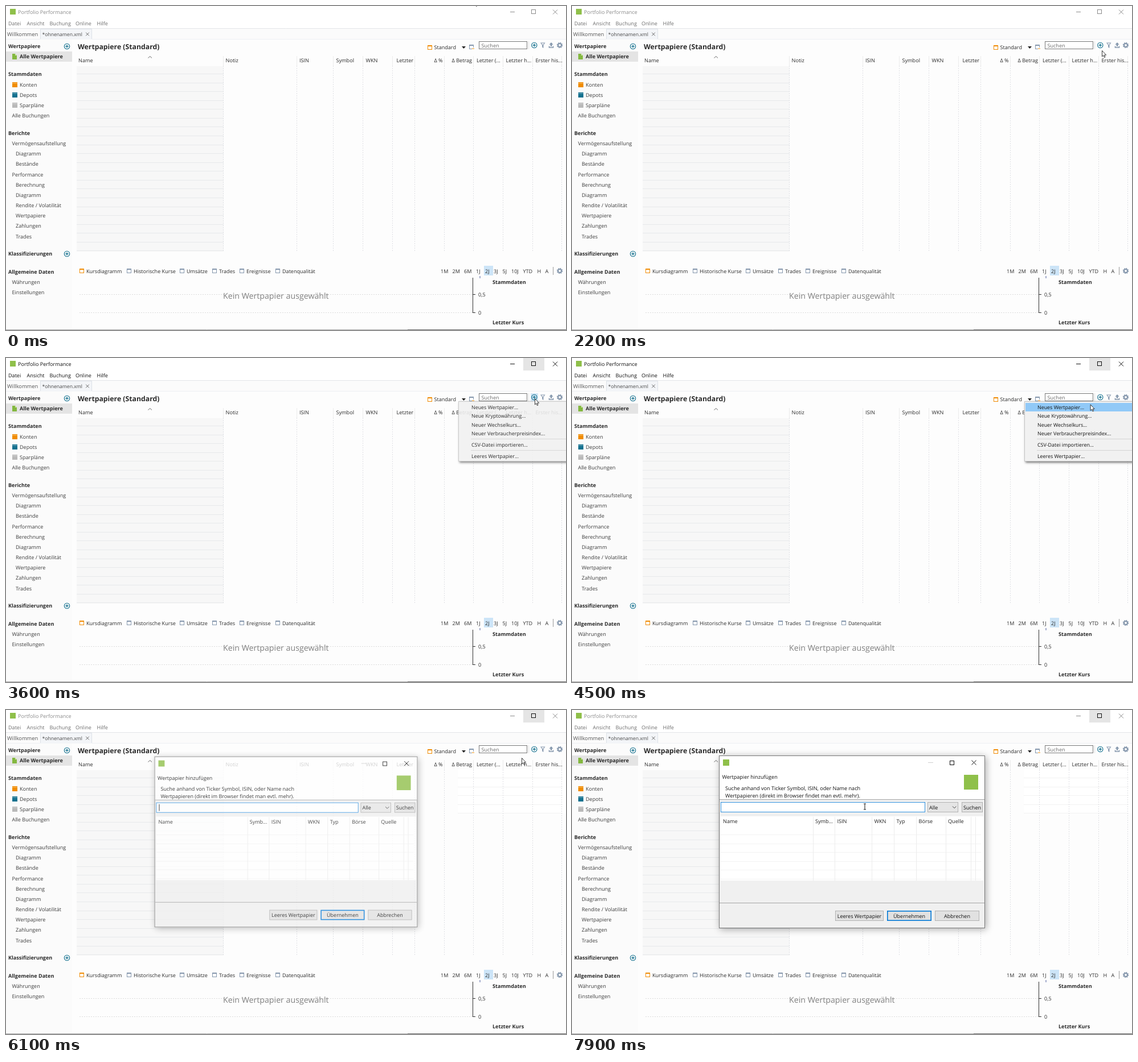
Animation of 983 by 570 pixels, one loop 8 s. Source, as an HTML page with a canvas:

```html
<!DOCTYPE html>
<html lang="de">
<head>
<meta charset="utf-8">
<title>Portfolio Performance</title>
<style>
html, body { margin: 0; width: 100%; height: 100%; overflow: hidden; background: #fdfdfd; }
canvas { display: block; }
</style>
</head>
<body>
<canvas id="stage" width="983" height="570"></canvas>
<script>
const stage = document.getElementById('stage');
const overlay = stage.cloneNode();
let ctx = stage.getContext('2d');
const overlayCtx = overlay.getContext('2d');
const LOOP = 8000, STEP = 100;
const INK = '#2b2b2b', SLATE = '#8496ac', ORANGE = '#f08c00', TEAL = '#14718f', BLUE = '#0078d7', LOGO = '#8fc04a';

// y is the middle of the capitals
function text(s, x, y, { size = 9.07, color = INK, bold = false, align = 'left' } = {}) {
  ctx.font = `${bold ? 'bold ' : ''}${size}px "Open Sans", "Noto Sans", sans-serif`;
  ctx.textAlign = align;
  ctx.fillStyle = color;
  ctx.fillText(s, x, y + size * .364);
}

function fill(x, y, w, h, color) {
  ctx.fillStyle = color;
  ctx.fillRect(x, y, w, h);
}

function frame(x, y, w, h, color, back, width = 1) {
  if (back) fill(x, y, w, h, back);
  ctx.strokeStyle = color;
  ctx.lineWidth = width;
  ctx.strokeRect(x + width / 2, y + width / 2, w - width, h - width);
}

function path(points, color, width = 1, dash = []) {
  ctx.beginPath();
  for (let i = 0; i < points.length; i += 2) ctx.lineTo(points[i], points[i + 1]);
  ctx.strokeStyle = color;
  ctx.lineWidth = width;
  ctx.setLineDash(dash);
  ctx.stroke();
  ctx.setLineDash([]);
}

function shape(points, color) {
  ctx.beginPath();
  for (let i = 0; i < points.length; i += 2) ctx.lineTo(points[i], points[i + 1]);
  ctx.closePath();
  ctx.fillStyle = color;
  ctx.fill();
}

function ring(x, y, r, color, width, dash = []) {
  ctx.beginPath();
  ctx.arc(x, y, r, 0, 2 * Math.PI);
  ctx.strokeStyle = color;
  ctx.lineWidth = width;
  ctx.setLineDash(dash);
  ctx.stroke();
  ctx.setLineDash([]);
}

function plus(x, y) {
  ring(x, y, 4.7, TEAL, 1.1);
  path([x - 2.8, y, x + 2.8, y], TEAL, 1.3);
  path([x, y - 2.8, x, y + 2.8], TEAL, 1.3);
}

function gear(x, y) {
  ring(x, y, 3, SLATE, 2);
  ring(x, y, 4.5, SLATE, 1.5, [1.8, 1.734]);
}

function pane(x, y, color) {
  frame(x, y, 8, 8, color, '#fff');
  fill(x, y, 8, 2, color);
}

function cross(x, y, r, color) {
  path([x - r, y - r, x + r, y + r], color);
  path([x - r, y + r, x + r, y - r], color);
}

function windowBar(active, hover) {
  const color = active ? '#111' : '#8b8b8b';
  fill(0, 0, 983, 40, '#fff');
  fill(7, 5, 10, 10, LOGO);
  text('Portfolio Performance', 21, 11, { color });
  if (hover) fill(908, 0, 37, 22, '#e5e5e5');
  path([885, 10.5, 893, 10.5], color);
  frame(922, 6, 8, 8, hover ? '#111' : color);
  cross(964, 10.5, 4, color);
  const menuColor = active ? '#111' : '#6d6d6d';
  [['Datei', 4], ['Ansicht', 36.5], ['Buchung', 76.5], ['Online', 122], ['Hilfe', 159.5]]
    .forEach(([s, x]) => text(s, x, 31, { color: menuColor }));
}

function tabs() {
  fill(0, 40, 983, 18, '#fbfbfb');
  path([0, 39.5, 983, 39.5], '#e3e5e8');
  path([0, 58.5, 983, 58.5], '#eef0f3');
  fill(60, 40, 91, 19, '#f3f5f8');
  path([60.5, 58, 60.5, 40.5, 150.5, 40.5, 150.5, 58], '#dde2e8');
  text('Willkommen', 2, 50, { size: 9.3, color: '#555' });
  text('*ohnenamen.xml', 63.5, 50, { size: 8.6, color: '#444' });
  cross(143, 49.5, 2.8, '#666');
}

function sidebar() {
  fill(0, 59, 116, 510, '#fbfbfb');
  fill(0, 80, 116, 18, '#e4e4e4');
  const heads = [['Wertpapiere', 71], ['Stammdaten', 120], ['Berichte', 224], ['Klassifizierungen', 436], ['Allgemeine Daten', 467.5]];
  heads.forEach(([s, y]) => text(s, 4, y, { bold: true }));
  text('Alle Wertpapiere', 24, 89, { bold: true });
  const lists = [
    [24, 138.5, 'Konten', 'Depots', 'Sparpläne'],
    [10.5, 193, 'Alle Buchungen'],
    [10.5, 242, 'Vermögensaufstellung'],
    [17, 260, 'Diagramm', 'Bestände'],
    [10.5, 296.5, 'Performance'],
    [17, 314.5, 'Berechnung', 'Diagramm', 'Rendite / Volatilität', 'Wertpapiere', 'Zahlungen', 'Trades'],
    [10.5, 485.5, 'Währungen', 'Einstellungen']
  ];
  lists.forEach(([x, y, ...names]) => names.forEach((s, i) => text(s, x, y + i * 18.15, { color: '#3d3d3d' })));
  shape([11, 84, 16, 84, 19, 87, 19, 94, 11, 94], '#84b840');
  shape([16, 84, 19, 87, 16, 87], '#d3e8b5');
  [ORANGE, TEAL, '#b9b9b9'].forEach((c, i) => {
    const y = 134 + i * 18;
    fill(11, y, 9, 9, c);
    fill(11, y + 1.5, 9, .8, 'rgba(255,255,255,.55)');
  });
  plus(107, 71);
  plus(107, 436);
}

function toolbar(fieldHover, plusHover) {
  text('Wertpapiere (Standard)', 126, 72, { size: 12.25, bold: true });
  pane(740, 69, ORANGE);
  text('Standard', 751.5, 73);
  shape([800, 71, 807, 71, 803.5, 75], '#222');
  pane(813, 68, SLATE);
  fill(818, 73, 4, 4, '#fff');
  path([818, 75, 822, 75], ORANGE);
  const shade = Math.round(122 - 105 * fieldHover);
  frame(830, 62, 85, 14, `rgb(${shade},${shade},${shade})`, '#fff');
  text('Suchen', 834.5, 70, { color: '#6d6d6d' });
  path([917.5, 62, 917.5, 76], '#dcdcdc');
  if (plusHover) fill(921, 62, 13, 14, '#d3e7f6');
  plus(927.3, 69);
  shape([938, 64.5, 946.5, 64.5, 943.4, 69, 943.4, 74, 941.2, 72.5, 941.2, 69], SLATE);
  shape([939.8, 65.5, 944.8, 65.5, 942.3, 68.4], '#fdfdfd');
  shape([957, 64, 960.5, 68, 958.2, 68, 958.2, 71, 955.8, 71, 955.8, 68, 953.5, 68], SLATE);
  path([953.5, 70.5, 953.5, 73, 960.5, 73, 960.5, 70.5], SLATE, 1.6);
  gear(972, 69);
}

function rowLines(x, end, y, count, color) {
  for (let i = 0; i < count; i++) {
    const row = Math.round(y + i * 15.57) + .5;
    path([x, row, end, row], color);
  }
}

function table(redrawn) {
  fill(124, 106, 258, 326, '#f7f7f7');
  rowLines(124, 382, 119, 21, '#e7e9eb');
  if (redrawn) {
    fill(793, 105, 190, 77, '#fff');
    rowLines(793, 977, 119, 5, '#f2f2f2');
  }
  [382, 511, 575, 627, 679, 718, 770, 821, 873, 925, 976].forEach(x => {
    path([x - .5, 88, x - .5, 105], '#ebebeb');
    path([x - .5, 105, x - .5, 432], '#dfe0e4', 1, [2, 2]);
  });
  const size = 9.15;
  [['Name', 127], ['Notiz', 385.5], ['ISIN', 515], ['Symbol', 579.5], ['WKN', 631.5],
    ['Letzter (...', 826], ['Letzter h...', 877.5], ['Erster his...', 929.5]]
    .forEach(([s, x]) => text(s, x, 96, { size }));
  [['Letzter', 715], ['Δ %', 766.5], ['Δ Betrag', 818]]
    .forEach(([s, x]) => text(s, x, 96, { size, align: 'right' }));
  path([249.5, 91.5, 252.8, 88.5, 256, 91.5], '#666');
}

function chart() {
  [['Kursdiagramm', 129], ['Historische Kurse', 212], ['Umsätze', 305], ['Trades', 362], ['Ereignisse', 410], ['Datenqualität', 473]]
    .forEach(([s, x], i) => {
      pane(x, 462, i ? SLATE : ORANGE);
      text(s, x + 12, 466.5);
    });
  fill(839, 457, 16, 17, '#cce4f7');
  [['1M', 763], ['2M', 783.5], ['6M', 804], ['1J', 825], ['2J', 841], ['3J', 856], ['5J', 871.5], ['10J', 887], ['YTD', 907.5], ['H', 932.5], ['A', 946.5]]
    .forEach(([s, x]) => text(s, x, 466.5));
  path([960.5, 459, 960.5, 473], '#999');
  gear(972, 466);
  [507.5, 539.5].forEach(y => {
    path([129, y, 819, y], '#dcdcdc', 1, [2, 2]);
    path([819, y, 824, y], '#333');
  });
  path([819.5, 478, 819.5, 540], '#333');
  path([832, 475, 832, 479], '#4a5a9a');
  text('0,5', 829, 508);
  text('0', 829, 540);
  text('Kein Wertpapier ausgewählt', 381, 510, { size: 14.2, color: '#808080' });
  text('Stammdaten', 854, 486, { bold: true });
  text('Letzter Kurs', 854, 557, { bold: true });
  path([0, 569.5, 705, 569.5], '#aaa');
  path([705, 569.5, 983, 569.5], '#666');
}

// Paints a whole window apart, then blends it in as one sheet
function fadeIn(alpha, scale, paint) {
  const main = ctx;
  ctx = overlayCtx;
  ctx.clearRect(0, 0, 983, 570);
  ctx.save();
  ctx.translate(491.5, 232);
  ctx.scale(scale, scale);
  ctx.translate(-491.5, -232);
  paint();
  ctx.restore();
  ctx = main;
  ctx.globalAlpha = alpha;
  ctx.drawImage(overlay, 0, 0);
  ctx.globalAlpha = 1;
}

function raised(x, y, w, h, color, blur, offset, alpha) {
  ctx.save();
  ctx.shadowColor = `rgba(0,0,0,${alpha})`;
  ctx.shadowBlur = blur;
  ctx.shadowOffsetX = ctx.shadowOffsetY = offset;
  fill(x, y, w, h, color);
  ctx.restore();
}

function popup(selected) {
  raised(794, 76, 200, 106, '#f1f1f1', 4, 2, .55);
  frame(794, 76, 200, 106, '#c4c4c4');
  if (selected) fill(796, 79, 187, 15, '#91c9f7');
  [['Neues Wertpapier...', 86.5], ['Neue Kryptowährung...', 102], ['Neuer Wechselkurs...', 117.5],
    ['Neuer Verbraucherpreisindex...', 133], ['CSV-Datei importieren...', 153], ['Leeres Wertpapier...', 173]]
    .forEach(([s, y]) => text(s, 817, y, { size: 8.9, color: '#111' }));
  [142.5, 162.5].forEach(y => path([816, y, 983, y], '#d4d4d4'));
}

function button(s, x, y, w, h, focus) {
  frame(x, y, w, h, focus ? BLUE : '#adadad', '#e1e1e1', focus ? 1.6 : .9);
  text(s, x + w / 2, y + h / 2 + .5, { align: 'center', color: '#111' });
}

function dialog(caret) {
  raised(258, 80, 467, 304, '#f0f0f0', 12, 2, .33);
  fill(258, 80, 467, 77, '#fff');
  frame(258, 80, 467, 304, '#777');
  fill(265, 87, 11, 11, LOGO);
  path([625, 92.5, 634, 92.5], '#cfcfcf');
  frame(663, 89, 8, 8, '#111');
  cross(705.5, 92.5, 4, '#111');
  text('Wertpapier hinzufügen', 263.5, 118, { color: '#111' });
  text('Suche anhand von Ticker Symbol, ISIN, oder Name nach', 269, 137.5, { size: 9.15, color: '#111' });
  text('Wertpapieren (direkt im Browser findet man evtl. mehr).', 269, 150.5, { size: 9.1, color: '#111' });
  fill(688, 114, 25, 26, LOGO);
  path([259, 157.5, 724, 157.5], '#a5a5a5');
  frame(261, 162, 359, 18, BLUE, '#fff', .8);
  if (caret) path([266.5, 165, 266.5, 177], '#111');
  frame(624, 162, 54, 18, '#adadad', '#e5e5e5', .9);
  text('Alle', 627, 171.5, { color: '#111' });
  path([668, 169.5, 671.2, 172.7, 674.4, 169.5], '#444');
  button('Suchen', 684, 162, 37, 18);
  fill(261, 187, 461, 113, '#fff');
  rowLines(261, 718, 219, 6, '#f3f3f3');
  [423, 461, 526, 565, 604, 656, 700, 708].forEach(x => path([x + .5, 188, x + .5, 300], '#ececec'));
  [['Name', 265], ['Symb...', 427], ['ISIN', 465.5], ['WKN', 530.5], ['Typ', 569.5], ['Börse', 608.5], ['Quelle', 660]]
    .forEach(([s, x]) => text(s, x, 196, { size: 9.15, color: '#222' }));
  path([259, 339.5, 724, 339.5], '#a5a5a5');
  button('Leeres Wertpapier', 462, 353, 85, 18);
  button('Übernehmen', 553, 353, 78, 18, true);
  button('Abbrechen', 637, 353, 78, 18);
}

// Pointer stops: time, x, y
const route = [
  [0, 821, -12], [1100, 821, -12], [1300, 832, 1], [1700, 901, 65], [2000, 924, 85],
  [2100, 931, 84], [2200, 930, 78], [2700, 928, 71], [4100, 928, 71], [4600, 905, 84],
  [6500, 905, 84], [6800, 777, 80], [7100, 612, 138], [7400, 528, 165], [7900, 514, 170], [LOOP, 514, 170]
];

function pointerAt(t) {
  const i = route.findIndex(stop => stop[0] > t);
  const [t0, x0, y0] = route[i - 1], [t1, x1, y1] = route[i];
  const k = (t - t0) / (t1 - t0);
  return [x0 + (x1 - x0) * k, y0 + (y1 - y0) * k];
}

const inside = ([x, y], l, t, r, b) => x >= l && x <= r && y >= t && y <= b;

function pointer([x, y], beam) {
  ctx.save();
  ctx.translate(x, y);
  if (beam) {
    path([0, -4.5, 0, 4.5], '#111');
    path([-2, -5, 2, -5], '#111');
    path([-2, 5, 2, 5], '#111');
  } else {
    const arrow = [.5, .5, .5, 11, 2.8, 8.8, 4.4, 12.5, 6, 11.8, 4.4, 8.2, 7.6, 8.2, .5, .5];
    shape(arrow, '#fff');
    path(arrow, '#222', .9);
  }
  ctx.restore();
}

function easeOut(t, start, length) {
  const u = Math.min(1, Math.max(0, (t - start) / length));
  return 1 - (1 - u) ** 2;
}

function draw(t) {
  const pos = pointerAt(t);
  const overSearch = inside(pos, 830, 62, 915, 76);
  const menuOpen = t > 3400 && t < 5900;
  const dialogOpen = t > 5900;
  fill(0, 0, 983, 570, '#fdfdfd');
  windowBar(t >= 3300 && t < 5900, t >= 3300);
  tabs();
  sidebar();
  toolbar(overSearch ? 1 : t >= 1700 && t < 2200 ? (2200 - t) / 500 : 0, t < 3700 && inside(pos, 921, 62, 934, 76));
  table(t >= 5900);
  chart();
  if (menuOpen) {
    const selected = t < 5800 && inside(pos, 796, 79, 983, 94);
    fadeIn(easeOut(t, 3400, 300), 1, () => popup(selected));
  }
  if (dialogOpen) {
    const p = easeOut(t, 5900, 300);
    const caret = Math.floor((t - 6100) / 530) % 2 === 0;
    fadeIn(p * p, .9 + .1 * p, () => dialog(caret));
  }
  pointer(pos, overSearch || dialogOpen && inside(pos, 261, 162, 620, 180));
}

function tick(now) {
  draw(Math.floor(now % LOOP / STEP) * STEP);
  requestAnimationFrame(tick);
}

ctx.textRendering = overlayCtx.textRendering = 'geometricPrecision';
requestAnimationFrame(tick);
</script>
</body>
</html>
```
